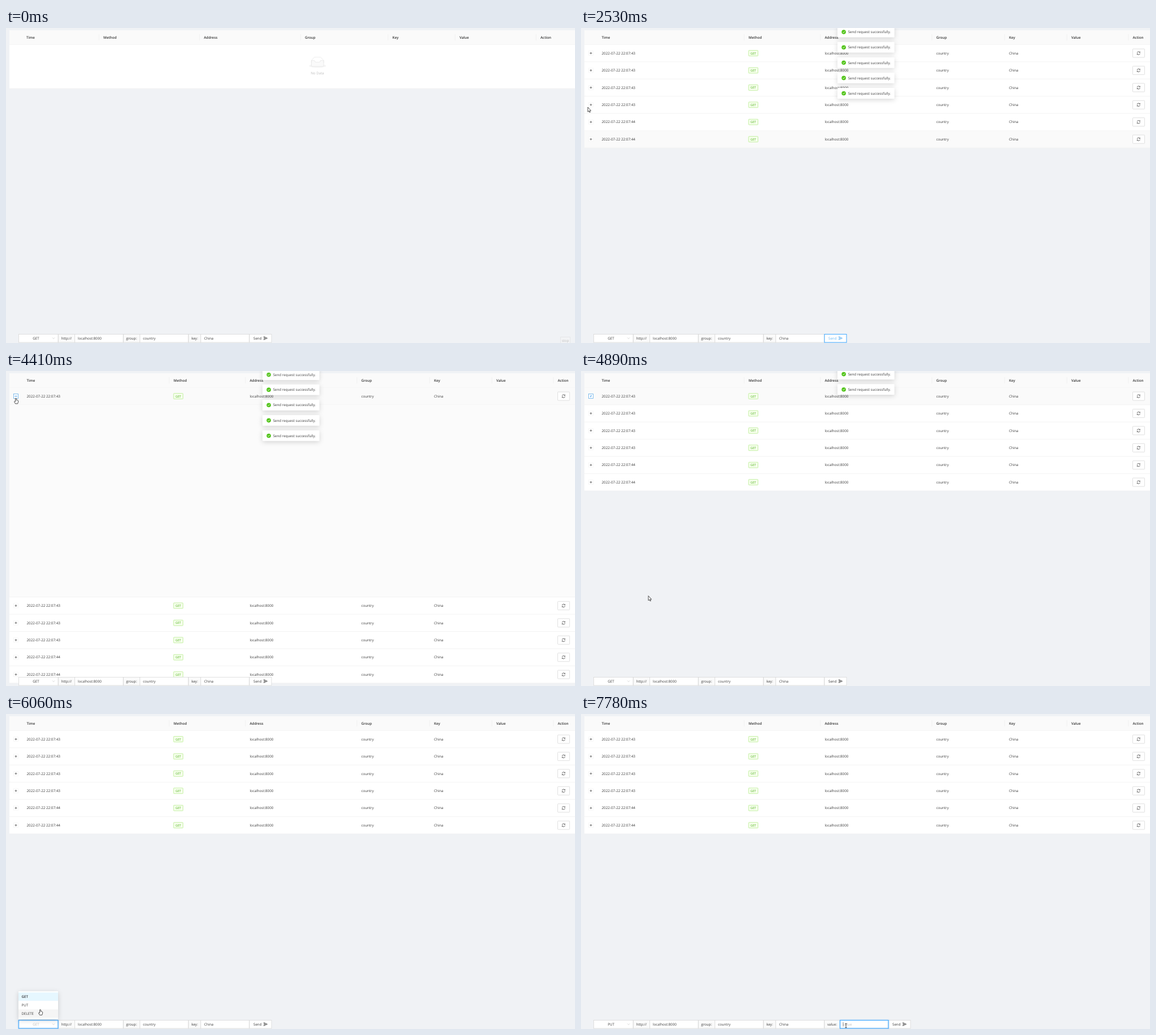
These frames come from a looping animation (1005 by 557 pixels, 8 s). An HTML page:

```html
<!DOCTYPE html>
<html lang="en">
<head>
<meta charset="utf-8">
<title>Request console</title>
<style>
  html, body { margin: 0; width: 100%; height: 100%; overflow: hidden; background: #f0f2f5; }
  svg { display: block; width: 1005px; height: 557px; }
  text { font: 6.2px "Open Sans", "Noto Sans", sans-serif; fill: #3a3a3a; text-rendering: geometricPrecision; white-space: pre; }
  .head { font-weight: 600; fill: #333; }
  .date { font-size: 6.3px; }
  .tag { font-size: 5.5px; fill: #52b01f; }
  .mid { text-anchor: middle; }
  .soft { fill: #bfbfbf; }
  .blue { fill: #69b9f5; }
  .float { filter: drop-shadow(0 2px 4px rgba(0,0,0,.16)); }
  .glow { filter: drop-shadow(0 0 1px rgba(24,144,255,.45)); }
</style>
</head>
<body>
<svg id="stage" viewBox="0 0 1005 557"></svg>
<script>
const LOOP = 8000, ROW_H = 30.43, TOP = 29.3;
const SLOT_H = 27.1, MESSAGE_LIFE = 3100, FADE = 300;
const DETAIL_H = 340, OPEN_AT = 3920, CLOSE_AT = 4740;
const MENU_AT = 5600, CHOSEN_AT = 6330, TYPE_AT = 7480;

const titles = ['Time', 'Method', 'Address', 'Group', 'Key', 'Value', 'Action'];
const emptyCols = [36, 172, 349.5, 528, 682.5, 801, 944];
const dataCols = [36.5, 296, 430.5, 627.5, 756, 866, 974.5];
const arrivals = [1290, 1290, 1380, 1730, 1900, 2040];

// time, x, y of the pointer's hot spot
const path = [
  [0, 440, 575], [440, 440, 562], [780, 438, 547], [2130, 438, 547],
  [2500, 12, 140], [2900, 12, 139], [3380, 14, 92], [3640, 17.5, 48],
  [4770, 17.5, 48], [4885, 119, 397.5], [5330, 68, 546], [5640, 68, 546],
  [5980, 60.5, 522.5], [6100, 60.5, 522.5], [6240, 59, 514], [6420, 59, 514],
  [6800, 72, 568], [7160, 468, 570], [7360, 468, 551], [8000, 468, 551]
];

const clamp = v => Math.max(0, Math.min(1, v));
const between = (t, a, b) => t >= a && t < b;
const easeOut = v => 1 - (1 - v) ** 5;
const smooth = v => v * v * (3 - 2 * v);

const rect = (x, y, w, h, fill, more = '') =>
  `<rect x="${x}" y="${y}" width="${w}" height="${h}" fill="${fill}" ${more}/>`;
const label = (x, y, s, cls = '') => `<text x="${x}" y="${y}" class="${cls}">${s}</text>`;
const line = (d, color, w = 0.7) =>
  `<path d="${d}" fill="none" stroke="${color}" stroke-width="${w}"/>`;
const group = (x, y, body, more = '') => `<g transform="translate(${x} ${y})" ${more}>${body}</g>`;
const border = (color, w = 0.8) => `stroke="${color}" stroke-width="${w}"`;

function pointerAt(t) {
  let i = 0;
  while (i < path.length - 2 && t >= path[i + 1][0]) i++;
  const [t0, x0, y0] = path[i], [t1, x1, y1] = path[i + 1];
  const k = smooth(clamp((t - t0) / (t1 - t0)));
  return [x0 + (x1 - x0) * k, y0 + (y1 - y0) * k];
}

function isPressed(t) {
  if (between(t, 1150, 2000)) return (t - 1150) % 150 < 85;
  return [3895, 4660, 5560, 6270, 7440].some(p => between(t, p, p + 85));
}

function header(cols) {
  const cells = cols.map((x, i) => label(x, 18.7, titles[i], 'head') +
    (i ? line(`M${x - 7.8} 11V22`, '#ececec') : ''));
  return rect(6, 4, 1000, 25, '#fafafa', 'rx="1"') + cells.join('') + line('M6 29.2H1005', '#f0f0f0');
}

function emptyTable() {
  const tray = `<ellipse cx="32" cy="34" rx="32" ry="7" fill="#f5f5f5"/>
    <g stroke="#d9d9d9" transform="translate(0 1)">
    <path fill="none" d="M55 13L45 1.3Q44 0 43 0H21Q20 0 19 1.3L9 13V22H55Z"/>
    <path fill="#fafafa" d="M41.6 16Q41.6 13 44 13H55V31Q55 35 52 35H12Q9 35 9 31V13H20Q22.4 13 22.4 16T24.6 19H39.4Q41.6 19 41.6 16Z"/></g>`;
  return rect(6, 4, 1000, 103.3, '#fff') + header(emptyCols) +
    group(535.2, 51, `<g transform="scale(.47)">${tray}</g>`) +
    label(550, 82, 'No Data', 'mid soft') + line('M6 107H1005', '#eee');
}

function toggle(y, active, focused, open) {
  const color = active ? '#2f95ee' : '#444';
  const frame = rect(-4, -4, 8, 8, '#fff', border(focused ? '#66aee8' : '#f5f5f5', 0.8));
  const bar = angle => `<path d="M-2 0H2" transform="rotate(${angle})" stroke="${color}" stroke-width=".7"/>`;
  return group(17.5, y, frame + bar(-180 * (1 - open)) + bar(90 + 90 * open));
}

function refresh(y) {
  const arcs = line('M-2.6 -.6A2.7 2.7 0 0 1 2.2 -1.6M2.6 .6A2.7 2.7 0 0 1 -2.2 1.6', '#333', 0.75) +
    line('M2.6 -2.8V-1.1H1M-2.6 2.8V1.1H-1', '#333', 0.65);
  return rect(974.5, y - 7.5, 21, 15, '#fff', border('#d9d9d9') + ' rx=".8"') + group(984.8, y, arcs);
}

function hoveredRow(t) {
  if (t < 2200) return -1;
  const y = pointerAt(t - 120)[1];
  return y < TOP ? -1 : Math.floor((y - TOP) / ROW_H);
}

function dataTable(t, count) {
  const isOpen = between(t, OPEN_AT, CLOSE_AT);
  const spin = clamp((t - OPEN_AT) / FADE) - clamp((t - CLOSE_AT) / FADE);
  const extra = isOpen ? DETAIL_H : 0;
  const hover = hoveredRow(t);
  let out = rect(6, 4, 1000, 25.3 + count * ROW_H + extra, '#fff') + header(dataCols);
  for (let i = 0; i < count; i++) {
    const y0 = TOP + i * ROW_H + (i ? extra : 0), y = y0 + 15.2, base = y + 2.2;
    if (i === hover) out += rect(6, y0, 1000, ROW_H, '#fafafa');
    const focused = i === 0 && between(t, 3660, MENU_AT);
    out += toggle(y, i === 0 && between(t, 3600, 4980), focused, i ? 0 : spin) +
      label(36.5, base, '2022-07-22 22:07:' + (i < 4 ? 43 : 44), 'date') +
      rect(296, y - 4.9, 16.6, 9.8, '#f6ffed', border('#b7eb8f') + ' rx=".8"') +
      label(304.3, y + 2, 'GET', 'mid tag') +
      label(430.5, base, 'localhost:8000') + label(627.5, base, 'country') +
      label(756, base, 'China') + refresh(y) +
      line(`M6 ${y0 + ROW_H}H1005`, '#f0f0f0');
    if (i === 0 && isOpen) out += rect(6, y0 + ROW_H, 1000, DETAIL_H, '#fbfbfb') +
      line(`M6 ${y0 + ROW_H + DETAIL_H}H1005`, '#f0f0f0');
  }
  return out;
}

function messages(t) {
  let y = -20, out = '';
  for (const start of arrivals) {
    if (t < start) break;
    const enter = easeOut(clamp((t - start) / FADE));
    const leave = clamp((t - start - MESSAGE_LIFE) / FADE);
    if (leave < 1) {
      const body = rect(-50.3, -9.4, 100.6, 18.8, '#fff', 'rx="1" class="float"') +
        '<circle cx="-39.2" r="3.8" fill="#52c41a"/>' +
        line('M-41 0L-39.7 1.4L-37.4 -1.4', '#fff', 0.8) +
        label(-31.6, 2.2, 'Send request successfully.');
      out += group(503.3, y - SLOT_H * (1 - enter), body, `opacity="${enter * (1 - leave)}"`);
    }
    y += Math.min(SLOT_H - 7.5 * leave, 70.5 * (1 - leave));
  }
  return out;
}

function field(x, w, s, textX, fill = '#fff', cls = '') {
  return rect(x, 541.5, w, 14.5, fill, border('#d9d9d9')) + label(textX, 550.8, s, cls);
}

function sendButton(x, active) {
  const color = active ? '#4ba9f2' : '#333';
  const plane = line('M-3 -2.8L3 0L-3 2.8L-2.2 0ZM-2.2 0H.6', color, 0.8);
  return rect(x, 541.5, 39, 14.5, '#fff', border(active ? '#40a9ff' : '#d9d9d9', active ? 1 : 0.8)) +
    label(x + 7, 550.8, 'Send', active ? 'blue' : '') + group(x + 28.5, 548.5, plane);
}

function toolbar(t) {
  const menuOpen = between(t, MENU_AT, CHOSEN_AT), put = t >= CHOSEN_AT;
  const selectFocus = between(t, MENU_AT, TYPE_AT);
  let out = field(22.5, 69.5, '', 0) +
    label(53, 550.8, put ? 'PUT' : 'GET', menuOpen ? 'mid soft' : 'mid') +
    line('M82 547.4L84 549.6L86 547.4', '#bfbfbf', 0.6) +
    field(92.5, 29, 'http://', 97.8, '#fafafa') + field(121.5, 85.5, 'localhost:8000', 127) +
    field(207.5, 29, 'group:', 212.3, '#fafafa') + field(236.5, 85.5, 'country', 242) +
    field(322.5, 21.5, 'key:', 327.6, '#fafafa') + field(344, 85.5, 'China', 350);
  if (selectFocus) out += rect(22.3, 541.5, 69.7, 14.5, 'none', border('#40a9ff', 1) + ' class="glow"');
  if (!put) return out + sendButton(430, between(t, 700, 3660));

  out += field(430, 27.5, 'value:', 435, '#fafafa') + sendButton(543, false) +
    field(457.5, 85.5, 'value', 463, '#fff', 'soft');
  if (t >= TYPE_AT) {
    out += rect(457.5, 541.5, 85.5, 14.5, 'none', border('#40a9ff', 1) + ' class="glow"') +
      line('M463 545V552.5', '#333', 0.6);
  }
  return out;
}

function menu(t) {
  const shown = clamp((t - MENU_AT) / 200) - clamp((t - CHOSEN_AT) / 200);
  if (shown <= 0) return '';
  const hover = Math.floor((pointerAt(t)[1] - 492.4) / 15);
  const items = ['GET', 'PUT', 'DELETE'].map((s, i) => {
    const fill = i === 0 ? '#e6f7ff' : i === hover ? '#f5f5f5' : '#fff';
    return rect(22, 492.4 + i * 15, 70, 15, fill) +
      label(27.6, 502.1 + i * 15, s, i === 0 ? 'head' : '');
  });
  const scale = 0.8 + 0.2 * smooth(shown);
  return `<g opacity="${shown}" transform="translate(0 ${539.5 * (1 - scale)}) scale(1 ${scale})">` +
    rect(22, 490.2, 70, 49.3, '#fff', 'rx="1" class="float"') + items.join('') + '</g>';
}

function pointer(t) {
  const [x, y] = pointerAt(t);
  const ink = 'fill="#fff" stroke="#222" stroke-width=".8" stroke-linejoin="round"';
  const arrow = `<path d="M0 0V8.3L1.9 6.6L3.1 9.3L4.4 8.8L3.2 6.2H5.6Z" ${ink}/>`;
  const hand = `<path d="M-.9 .5Q0 -.6 .9 .5V3.4Q3.8 3.2 4.2 4.6L4 7.2L3.1 9.8H-1L-3 6.2Q-2.6 4.8 -.9 6Z" ${ink}/>`;
  const beam = line('M-1.5 -3.5H1.5M0 -3.5V3.5M-1.5 3.5H1.5', '#222', 0.8);
  const onLink = between(t, 640, 2170) || between(t, 3600, 4790) || between(t, 5290, 6540);
  const shape = t > 7160 ? beam : onLink ? hand : arrow;
  const spot = isPressed(t) ? '<circle cx="-.7" cy=".8" r="5.6" fill="#ffe640" opacity=".75"/>' : '';
  return group(x, y, spot + shape);
}

function cornerTag(t) {
  if (t >= 1290) return '';
  return rect(979.5, 546.5, 17, 14, '#f2f3f5', border('#e3e4e7')) +
    (t < 70 ? label(988, 554.6, 'stop', 'mid soft') : '');
}

function scene(t) {
  const count = arrivals.filter(a => t >= a).length;
  return rect(0, 0, 1005, 557, '#f0f2f5') + (count ? dataTable(t, count) : emptyTable()) +
    cornerTag(t) + toolbar(t) + menu(t) + messages(t) + pointer(t);
}

const stage = document.getElementById('stage');
const began = performance.now();
let last = '';
function tick() {
  const markup = scene((performance.now() - began) % LOOP);
  if (markup !== last) stage.innerHTML = last = markup;
  requestAnimationFrame(tick);
}
tick();
</script>
</body>
</html>
```
